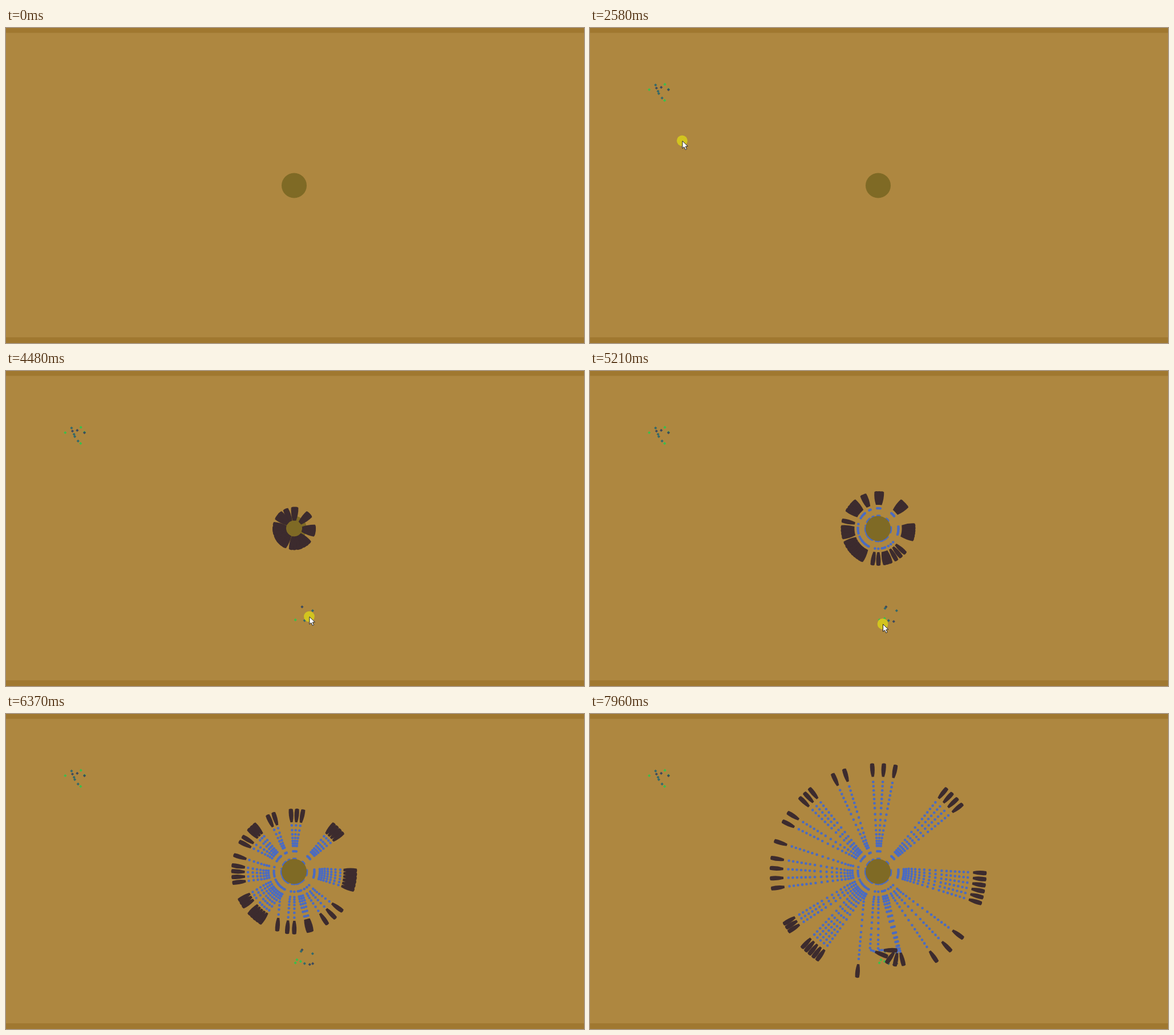
An HTML page with a canvas that plays this animation: 1013x553 px, repeating every 8000 ms.

```html
<!DOCTYPE html>
<html>
<head>
<meta charset="utf-8">
<style>
html, body { margin: 0; height: 100%; overflow: hidden; background: #ae8740; }
canvas { display: block; }
</style>
</head>
<body>
<canvas id="stage" width="1013" height="553"></canvas>
<script>
const ctx = document.getElementById('stage').getContext('2d');
const LOOP = 8000, HATCH = 4400, PAUSE = 6370, RESUME = 6600, STEP = 123.3;
const NEST = { x: 505, y: 276.5, r: 22 };
const FOOD_SPOT = { x: 536, y: 432 };

const mix = (a, b, f) => a + (b - a) * f;
const random = n => Math.abs(Math.sin(n * 127.1 + 3.7) * 43758.5453) % 1;

// Interpolates rows of [key, ...values]
function track(knots, key) {
  let i = 1;
  while (i < knots.length - 1 && key > knots[i][0]) i++;
  const [k0, ...a] = knots[i - 1], [k1, ...b] = knots[i];
  const f = Math.min(1, Math.max(0, (key - k0) / (k1 - k0)));
  return a.map((v, n) => mix(v, b[n], f));
}

// Groups of ants fan out evenly: start bearings, end bearings (degrees)
const groups = [
  { count: 3, start: [-92.7, -84], end: [-93.2, -80.7] },
  { count: 4, start: [-49, -38], end: [-50.5, -38.7] },
  { count: 6, start: [-5, 17], end: [0.8, 17.2] },
  { count: 3, start: [42.4, 60], end: [38.3, 57] },
  { count: 3, start: [70, 79], end: [74.5, 76], seeks: true },
  { count: 2, start: [89.5, 99], end: [90, 96], seeks: true },
  { count: 1, start: [117.7], end: [101.6] },
  { count: 5, start: [121, 140], end: [124.5, 135] },
  { count: 3, start: [144, 156], end: [146, 151] },
  { count: 4, start: [166, 182], end: [170.8, 187.2] },
  { count: 1, start: [192.5], end: [196.4] },
  { count: 2, start: [211, 217], end: [207.9, 213.2] },
  { count: 3, start: [222, 229], end: [223.3, 230.4] },
  { count: 2, start: [244, 248], end: [245, 251.5] }
];

function polar(r, deg) {
  const a = deg * Math.PI / 180;
  return [r, NEST.x + r * Math.cos(a), NEST.y + r * Math.sin(a)];
}

function makePath({ count, start, end, seeks }, i) {
  const pick = ([a, b = a]) => mix(a, b, count > 1 ? i / (count - 1) : 0);
  const path = [polar(NEST.r, pick(start)), polar(53.5, pick(start))];
  if (!seeks) return [...path, polar(178.5, pick(end))];
  // Seekers leave the straight line and turn to the food
  const turn = polar(138, pick(end)), [, x, y] = turn;
  const heading = Math.atan2(FOOD_SPOT.y - y, FOOD_SPOT.x - x) - (1 - i) * 0.5;
  return [...path, turn, [178.5, x + 22 * Math.cos(heading), y + 22 * Math.sin(heading)]];
}

const paths = groups.flatMap(g => Array.from({ length: g.count }, (_, i) => makePath(g, i)));

// Trail drops start dense and become evenly spaced
const drops = [22, 35.5];
for (let k = 0; k < 16; k++)
  drops.push(45 + 7.5 * k - 10 * Math.max(0, Math.sin(Math.PI * k / 9.3)));

const march = [[HATCH, 22], [4980, 51], [5210, 53.5], [5790, 81], [PAUSE, 98.5],
  [6860, 128], [7340, 145.5], [7960, 178.5]];

const pointer = [[70, 520, 510], [560, 207, 143], [800, 112, 97], [1200, 108, 130], [1570, 123, 104],
  [2200, 106, 112], [2520, 135, 164], [2900, 300, 375], [3320, 530, 432], [3660, 508, 411],
  [4140, 540, 425], [5210, 513, 444], [5790, 515, 443], [6369, 849, 519]];

const foodColors = ['#34696a', '#3bbf4c', '#3d4a5c'];

function scatter(count, left, top, size, from, every, seed) {
  return Array.from({ length: count }, (_, i) => ({
    x: left + size * random(seed + i),
    y: top + size * random(seed + i + 50),
    color: foodColors[i % 3],
    time: from + every * i
  }));
}
const food = [...scatter(11, 103, 96, 35, 900, 140, 1), ...scatter(9, 506, 413, 32, 3400, 290, 20)];

function disc(x, y, r, color) {
  ctx.fillStyle = color;
  ctx.beginPath();
  ctx.arc(x, y, r, 0, Math.PI * 2);
  ctx.fill();
}

function polygon(x, y, points, color) {
  ctx.fillStyle = color;
  ctx.beginPath();
  points.forEach(([px, py]) => ctx.lineTo(x + px, y + py));
  ctx.closePath();
  ctx.fill();
}

function drawAnt(path, r) {
  const [x, y] = track(path, r);
  const [bx, by] = r > 24 ? track(path, r - 2) : [NEST.x, NEST.y];
  ctx.save();
  ctx.translate(x, y);
  ctx.rotate(Math.atan2(y - by, x - bx));
  ctx.fillStyle = '#3c2b2e';
  ctx.beginPath();
  ctx.moveTo(-12, -2);
  ctx.quadraticCurveTo(0, -5, 11, -3.5);
  ctx.quadraticCurveTo(13, 0, 11, 3.5);
  ctx.quadraticCurveTo(0, 5, -12, 2);
  ctx.closePath();
  ctx.fill();
  ctx.restore();
}

function drawPointer(t) {
  const [x, y] = track(pointer, t);
  disc(x, y, 9.4, '#d2c41f');
  const arrow = [[0, 0], [0, 13], [3, 10.4], [5.3, 15.3], [7.6, 14.2], [5.4, 9.6], [9.5, 9.3]];
  polygon(x + 0.5, y + 0.5, arrow, '#fff');
  ctx.strokeStyle = '#222';
  ctx.lineWidth = 1;
  ctx.stroke();
}

// The march halts for a moment, then goes on in visible steps
function marchTime(t) {
  if (t < RESUME) return Math.min(t, PAUSE);
  return RESUME + Math.floor((t - RESUME) / STEP) * STEP;
}

function draw(t) {
  ctx.fillStyle = '#ae8740';
  ctx.fillRect(0, 0, 1013, 553);
  ctx.fillStyle = '#a07830';
  ctx.fillRect(0, 0, 1013, 8.5);
  ctx.fillRect(0, 543, 1013, 10);

  for (const { x, y, color, time } of food)
    if (t >= time) polygon(x, y, [[0, -2.6], [2.6, 0], [0, 2.6], [-2.6, 0]], color);

  const hatched = t >= HATCH;
  const [radius] = track(march, marchTime(t));
  if (hatched)
    for (const path of paths)
      for (const r of drops)
        if (r <= radius) disc(...track(path, r), 2.3, '#4a6bc2');

  disc(NEST.x, NEST.y, NEST.r, '#7f6a25');
  if (hatched) paths.forEach(path => drawAnt(path, radius));
  if (t >= 70 && t < PAUSE) drawPointer(t);
}

function frame() {
  draw(performance.now() % LOOP);
  requestAnimationFrame(frame);
}
frame();
</script>
</body>
</html>
```
